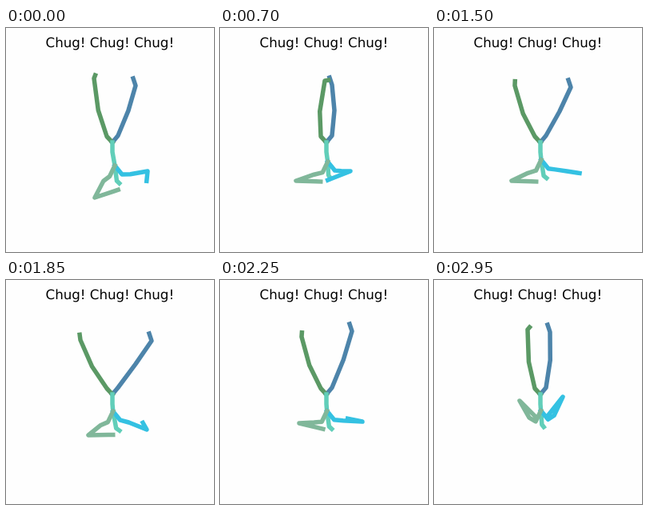
These frames come from a looping animation (260x280 px, 3 s). An HTML page:

```html
<!DOCTYPE html>
<html lang="en">
<head>
<meta charset="utf-8">
<title>Chug</title>
<style>
  html, body { margin: 0; width: 100%; height: 100%; overflow: hidden; background: #fefefe; }
  svg { display: block; width: 260px; height: 280px; }
  polyline { fill: none; stroke-width: 5.5; stroke-linecap: square; stroke-linejoin: round; }
  text {
    font: 16.67px "DejaVu Sans", sans-serif;
    text-anchor: middle;
    text-rendering: geometricPrecision;
  }
</style>
</head>
<body>
<svg viewBox="0 0 260 280">
  <text x="129.8" y="24">Chug! Chug! Chug!</text>
  <polyline id="rightLeg" stroke="#4d84aa"/>
  <polyline id="leftLeg" stroke="#5b9965"/>
  <polyline id="spine" stroke="#61ceb9"/>
  <polyline id="rightArm" stroke="#34c1e2"/>
  <polyline id="leftArm" stroke="#80b79a"/>
</svg>
<script>
const LOOP = 3000, STEP = 50;
const ROOT = [133, 143];

// Key points of the leading joints; the other joints follow from them.
const times = [0, 700, 1100, 1500, 1850, 2250, 2950];
const rightAnkle = [[162, 72], [140, 71], [151, 70], [171, 74], [182, 76], [165, 64], [145, 65]];
const leftAnkle = [[110, 63], [131, 66], [121, 70], [101, 72], [93, 75], [102, 71], [117, 62]];
const rightElbow = [[177, 179], [163, 179], [168, 176], [166, 179], [176, 187], [178, 177], [161, 146]];
const rightWrist = [[176, 189], [140, 188], [144, 181], [179, 181], [172, 180], [163, 174], [146, 165]];
const leftElbow = [[111, 212], [95, 191], [94, 190], [97, 191], [103, 194], [99, 179], [107, 151]];

const add = ([x, y], dx, dy) => [x + dx, y + dy];
const mix = (a, b, u) => a.map((v, i) => v + (b[i] - v) * u);

// Smooth cubic through the key points
function follow(path, t) {
  const last = times.length - 1;
  let i = 0;
  while (i < last - 1 && t >= times[i + 1]) i++;
  const span = times[i + 1] - times[i], u = (t - times[i]) / span;
  const slope = (k, c) => {
    const p = Math.max(k - 1, 0), n = Math.min(k + 1, last);
    return (path[n][c] - path[p][c]) / (times[n] - times[p]) * span;
  };
  return path[i].map((v, c) => {
    const d = path[i + 1][c] - v, m = slope(i, c), n = slope(i + 1, c);
    return v + u * (m + u * (3 * d - 2 * m - n + u * (m + n - 2 * d)));
  });
}

function draw(id, ...points) {
  document.getElementById(id).setAttribute("points", points.join(" "));
}

function drawLeg(id, hip, ankle, kneeX, kneeY, toeX, toeY) {
  const knee = add(mix(hip, ankle, 0.45), kneeX, kneeY);
  draw(id, ROOT, hip, knee, ankle, add(ankle, toeX, toeY));
}

function drawArm(id, side, chest, collar, elbow, wrist) {
  const shoulder = add(mix(collar, elbow, 0.2), 4 * side, 0.5);
  draw(id, chest, collar, shoulder, elbow, wrist, mix(elbow, wrist, 1.23));
}

function frame() {
  const t = Math.floor(performance.now() % LOOP / STEP) * STEP;

  const right = follow(rightAnkle, t), left = follow(leftAnkle, t);
  const spread = right[0] - 161, leftSpread = 110 - left[0];
  drawLeg("rightLeg", [140, 134.5], right, 3, -3, -3, -9);
  drawLeg("leftLeg", [126, 135.5], left, -3.5, 0,
    1.5 - 0.14 * leftSpread, -4 - 0.15 * leftSpread);

  // The torso settles upwards and leans as the legs open.
  const sag = 9 * Math.exp(-t / 900);
  const chest = [133.5 + 0.28 * sag, 163 + sag];
  const neck = add(chest, 2.4 + 0.07 * spread, 19 + 0.1 * spread);
  draw("spine", ROOT, [133, 155], chest, neck, add(neck, 3.1 + 0.05 * spread, 3));

  drawArm("rightArm", 1, chest, add(chest, 9, 11),
    follow(rightElbow, t), follow(rightWrist, t));

  // The left forearm keeps its length and tilts with the height of the elbow.
  const elbow = follow(leftElbow, t);
  const tilt = 0.42 * (193 - elbow[1]);
  drawArm("leftArm", -1, chest, add(chest, -6.5, 13.5),
    elbow, add(elbow, Math.sqrt(25 ** 2 - tilt ** 2), tilt));

  requestAnimationFrame(frame);
}
frame();
</script>
</body>
</html>
```
